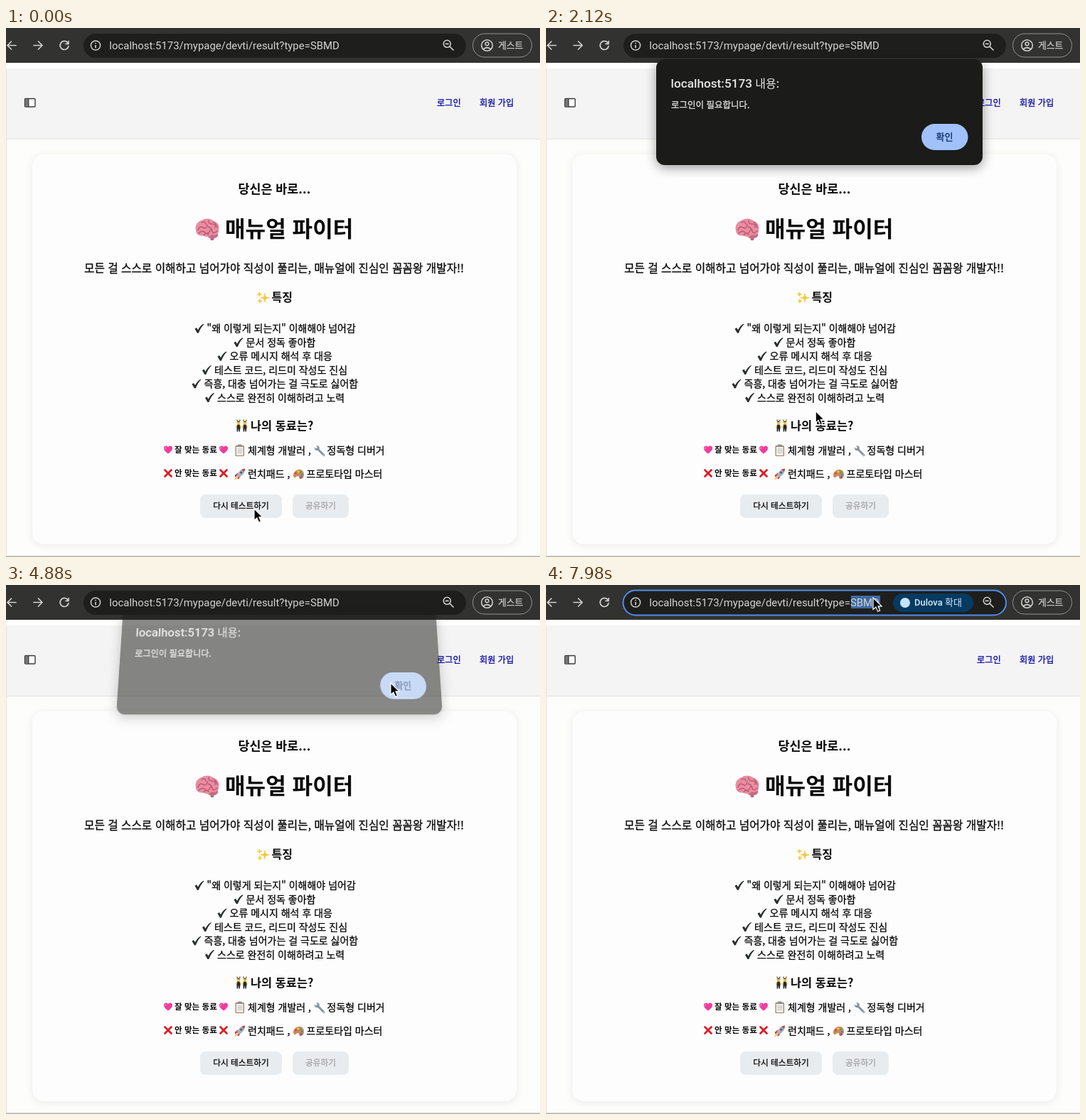
Recreate the animation shown at these times as an HTML page. Size 751 by 745 pixels, loop 8 s.

```html
<!DOCTYPE html>
<html lang="ko">
<head>
<meta charset="utf-8">
<title>DevTI result</title>
<style>
  html, body { margin: 0; width: 100%; height: 100%; overflow: hidden; background: #fdfdfc; }
  svg { position: absolute; left: 0; top: 0; overflow: visible; }
  text { font-family: "Noto Sans CJK KR", "Noto Sans CJK JP", "Noto Sans CJK", sans-serif; white-space: pre; }
  .latin { font-family: Roboto, "Noto Sans CJK KR", "Noto Sans CJK JP", sans-serif; }
  .line { fill: none; stroke: #d0d0ce; stroke-width: 1.7; stroke-linecap: round; stroke-linejoin: round; }
  #card { position: absolute; left: 37px; top: 178px; width: 681px; height: 549px; border-radius: 16px;
    background: #fdfdfd; box-shadow: 0 2px 12px rgba(40, 40, 60, .09); }
  #dialog { position: absolute; left: 155px; top: 44px; width: 459px; height: 149px; border-radius: 12px;
    background: #1b1b19; box-shadow: 0 4px 16px rgba(0, 0, 0, .38); transform-origin: 50% 100%; }
</style>
</head>
<body>
<svg id="chrome" width="751" height="745"></svg>
<div id="card"></div>
<svg id="page" width="751" height="745"></svg>
<div id="dialog"><svg id="alert" width="459" height="149"></svg></div>
<svg id="pointer" width="20" height="26">
  <path d="M0 0V16.5L3.9 13L6.6 19.2L9.6 17.9L7 11.8H12Z" fill="#000" stroke="#fff" stroke-width="1.2"/>
</svg>
<script>
const $ = id => document.getElementById(id);

const bold = 'font-weight="700"';
const latin = 'class="latin"';
const medium = fill => `stroke="${fill}" stroke-width=".3"`;

// Text placed by its left edge and vertical centre
const text = (x, cy, size, str, fill = '#0a0a0a', attrs = medium(fill)) =>
  `<text x="${x}" y="${cy + size * .36}" font-size="${size}" fill="${fill}" ${attrs}>${str}</text>`;
const rect = (x, y, w, h, r, fill, attrs = '') =>
  `<rect x="${x}" y="${y}" width="${w}" height="${h}" rx="${r}" fill="${fill}" ${attrs}/>`;
const circle = (x, y, r, fill, attrs = '') =>
  `<circle cx="${x}" cy="${y}" r="${r}" fill="${fill}" ${attrs}/>`;
const path = (d, fill, attrs = '') => `<path d="${d}" fill="${fill}" ${attrs}/>`;
const line = d => `<path class="line" d="${d}"/>`;
const at = (x, y, art) => `<g transform="translate(${x} ${y})">${art}</g>`;

const check = path('M.5 7.5L3 5.8L5 9C7 5 10 1.6 13 .3L13.4 1.2C10 4.5 7.6 8.6 5.9 13.2L4 13.5Z', '#2b2f2f');
const cross = path('M1.5 1.5L10.5 10.5M10.5 1.5L1.5 10.5', 'none', 'stroke="#dc1c28" stroke-width="2.8" stroke-linecap="round"');
const heart = path('M6 11.5C2 8.5 0 6.5 0 3.7C0 .2 4.4-.6 6 2.3C7.6-.6 12 .2 12 3.7C12 6.5 10 8.5 6 11.5Z', '#f23b9d') +
  path('M3 2.2Q1.6 3 2 5', 'none', 'stroke="#ff9bd2" stroke-width="1.3"');
const star = (x, y, r) =>
  path(`M${x} ${y - r}Q${x} ${y} ${x + r} ${y}Q${x} ${y} ${x} ${y + r}Q${x} ${y} ${x - r} ${y}Q${x} ${y} ${x} ${y - r}Z`,
    '#fbc63c', 'stroke="#fbc63c" stroke-width=".9"');
const sparkles = star(11, 9, 6) + star(3.5, 4, 3) + star(4, 13.5, 3);

const brain =
  path('M20 21L27 22L26 31L22 31Z', '#b9657c') +
  path('M17 25Q21 31 30 27Q35 23 29 19L18 20Z', '#c56c83') +
  path('M1 17C-1 10 4 4 9 3C14-1 23 0 26 4C32 5 35 12 33 17C34 22 28 25 23 23C21 27 14 27 12 24C6 26 1 22 1 17Z', '#e98da2') +
  path('M4 17Q6 10 11 13T17 9M9 6Q14 3 15 8M19 3Q18 8 24 8T28 13M5 21Q10 16 14 20T22 16M18 12Q23 13 24 18T31 18M12 24Q15 19 19 23M26 5Q30 8 31 13',
    'none', 'stroke="#bd5973" stroke-width="1.5" stroke-linecap="round"');

const dancer =
  path('M2 1L2.6 5M6 1L5.4 5', 'none', 'stroke="#222" stroke-width="1"') +
  circle(4, 5.2, 2.4, '#f5bd32') +
  path('M1.8 5Q4 1.6 6.2 5L5.5 4.4H2.5Z', '#3a2a18') +
  path('M2 8H6L6.6 12L5.8 18H4.5L4 13L3 18H1.7L1.5 12Z', '#24262a') +
  path('M2 8.5L.4 12M6 8.5L7.6 12', 'none', 'stroke="#f5bd32" stroke-width="1.2"');
const dancers = dancer + at(9, 0, dancer);

const clipboard = rect(1.5, 1.5, 12.5, 15, 1.5, '#a9784f') + rect(2.7, 3.2, 10.1, 12.3, .5, '#f1f2f2') +
  rect(4.7, 0, 6, 3.4, 1, '#8b9298') +
  path('M4.5 6.5H11.5M4.5 9H11.5M4.5 11.5H11.5', 'none', 'stroke="#a9adb2" stroke-width=".9"');
const wrench = path('M5 5L14 14', 'none', 'stroke="#8b949b" stroke-width="3" stroke-linecap="round"') +
  path('M1 3L3.5 5.3L5.3 3.6L3.2 1C6 0 8.5 2.4 7.7 5L5.4 7.5C3 8.4 .2 6 1 3Z', '#8b949b') + circle(13.7, 13.7, .7, '#e8eaec');
const rocket = path('M5 6L1 9L1 12L5 10ZM9 10L7 14L4.5 15L5 11Z', '#d83a37') +
  path('M3 11L0 16L5 13Z', '#f9b233') +
  path('M15 0C10 0 6 4 3.5 10L6 12.5C12 10 15 6 15 0Z', '#a8b2bb') +
  path('M15 0Q12 0 10.5 1.5L13.5 4.5Q15 3 15 0Z', '#d83a37') + circle(9.7, 5.6, 1.7, '#2f6790');
const palette = path('M8 1C12.5 0 16 3 16 8C16 12.6 12.5 15 10.5 14C8 13 10 10 8 10C5 10 5 13 2.5 12C-1 9 2 2 8 1Z', '#c98b56') +
  [[4.5, 6, '#e3423f'], [8, 3.8, '#f7c531'], [11.6, 4.6, '#49a94e'], [13.2, 8, '#3c87d6'], [12, 11.4, '#8d4bb5']]
    .map(([x, y, c]) => circle(x, y, 1.5, c)).join('');

const url = 'localhost:5173/mypage/devti/result?type=SBMD';
$('chrome').innerHTML =
  rect(0, 0, 751, 49, 0, '#323231') +
  rect(109, 8, 538, 34, 17, '#1e1e1d') +
  rect(108.5, 7.5, 538.5, 35, 17.5, 'none', 'stroke="#4f8eea" stroke-width="2" id="ring"') +
  rect(429, 15, 41, 18, 0, '#3f6ba3', 'id="selection"') +
  line('M14 24.5H2M7.5 19L2 24.5L7.5 30M39 24.5H51M45.5 19L51 24.5L45.5 30') +
  line('M87 21A6 6 0 1 0 88 25.5M88 18.5V22.3H84') +
  circle(126, 24.5, 6.6, 'none', 'stroke="#d0d0ce" stroke-width="1.5"') +
  line('M126 24.5V27.5M126 21.3V21.4') +
  text(145.3, 24.6, 14.95, url, '#d4d4d2', latin) +
  `<g id="chip">${rect(488, 12, 113, 26, 13, '#073a61') + circle(505, 25, 7, '#c5e2ff') +
    text(518, 24.8, 13, 'Dulova 확대', '#d2e9ff', latin + ' font-weight="500"')}</g>` +
  circle(620.3, 22.3, 5, 'none', 'stroke="#d0d0ce" stroke-width="1.6"') + line('M624 26L629 31M618.5 22.3H622') +
  rect(656.5, 8, 83, 33, 16.5, 'none', 'stroke="#92928f"') +
  circle(676.5, 24.5, 7.8, 'none', 'stroke="#d0d0ce" stroke-width="1.6"') +
  circle(676.5, 22.3, 2.4, 'none', 'stroke="#d0d0ce" stroke-width="1.5"') + line('M671.5 29.7Q676.5 25.7 681.5 29.7') +
  text(692, 24.7, 12.8, '게스트', '#c6c6c4') +
  rect(0, 49, 751, 8, 0, '#fff') +
  rect(0, 57, 751, 99, 0, '#f4f4f5') + rect(0, 156, 751, 1, 0, '#e3e3e5') +
  rect(0, 57, 1, 687, 0, '#e2e2e2') + rect(0, 743.5, 751, 1.5, 0, '#b5afa8') +
  rect(26.5, 99.5, 14.5, 11.5, 1, '#fafafa', 'stroke="#3c3c3c" stroke-width="1.4"') +
  rect(27, 100, 4.5, 10.5, 0, '#77777a') + rect(31, 99.5, 1.3, 11.5, 0, '#3c3c3c') +
  text(606, 105.3, 12.2, '로그인', '#0b0ba8') +
  text(666, 105.3, 12.2, '회원 가입', '#0b0ba8');

const traits = [
  [265, '"왜 이렇게 되는지" 이해해야 넘어감'], [320, '문서 정독 좋아함'], [297, '오류 메시지 해석 후 대응'],
  [275.5, '테스트 코드, 리드미 작성도 진심'], [261, '즉흥, 대충 넘어가는 걸 극도로 싫어함'], [279.5, '스스로 완전히 이해하려고 노력']];
const button = (x, w, label, fill) =>
  rect(x + .5, 657.5, w - 1, 32, 7, '#e9ecef', 'stroke="#e6edf1"') +
  text(x + w / 2, 673, 11.7, label, fill, 'text-anchor="middle" ' + medium(fill));

$('page').innerHTML =
  text(326.5, 226.5, 17.4, '당신은 바로...', '#0a0a0a', bold) +
  at(266, 268, brain) + text(308, 283, 31.1, '매뉴얼 파이터', '#0a0a0a', bold) +
  text(110, 338, 15.68, '모든 걸 스스로 이해하고 넘어가야 직성이 풀리는, 매뉴얼에 진심인 꼼꼼왕 개발자!!') +
  at(353, 371, sparkles) + text(373.5, 379, 16, '특징', '#0a0a0a', bold) +
  traits.map(([x, label], i) => {
    const y = 423.3 + i * 19.45;
    return at(x, y - 7, check) + text(x + 17.5, y, 14, label);
  }).join('') +
  at(323, 550.5, dancers) + text(344, 560, 16.4, '나의 동료는?', '#0a0a0a', bold) +
  at(222, 588, heart) + text(237, 593.7, 11.6, '잘 맞는 동료', '#0a0a0a', bold) + at(300, 588, heart) +
  at(321, 586.5, clipboard) + text(340, 595, 14, '체계형 개발러 ,') +
  at(433, 587.5, wrench) + text(451.5, 595, 14, '정독형 디버거') +
  at(222, 621, cross) + text(237, 627, 11.6, '안 맞는 동료', '#0a0a0a', bold) + at(300, 621, cross) +
  at(321, 620.5, rocket) + text(340, 628.3, 14, '런치패드 ,') +
  at(403, 621, palette) + text(422.5, 628.3, 14, '프로토타입 마스터') +
  button(273, 115, '다시 테스트하기', '#0a0a0a') + button(403, 79, '공유하기', '#a3a3a6');

$('alert').innerHTML =
  text(20.5, 33.8, 17.2, 'localhost:5173 <tspan font-size="16">내용:</tspan>', '#e6e6e4', latin + ' font-weight="500"') +
  text(21, 64.5, 12.5, '로그인이 필요합니다.', '#e2e2e0') +
  rect(373, 91, 65.5, 37, 18.5, '#a0c1fa') +
  text(405.5, 109.5, 13, '확인', '#0b2a66', 'text-anchor="middle" ' + medium('#0b2a66'));

// Pointer route: time, x, y
const route = [[0, 349, 677], [600, 340, 678], [1200, 327, 675], [1700, 327, 675], [2120, 379, 540], [2900, 515, 220],
  [3520, 546, 114], [4150, 548, 146], [4700, 541, 142], [4880, 541, 138], [5440, 536, 131], [5800, 530, 115],
  [6500, 468, 20], [7300, 462, 18], [8000, 460, 18]];

const clamp = v => Math.max(0, Math.min(1, v));

function pointerAt(t) {
  const i = route.findIndex(p => p[0] > t);
  const [t0, x0, y0] = route[i - 1], [t1, x1, y1] = route[i];
  const u = (t - t0) / (t1 - t0);
  return [x0 + (x1 - x0) * u, y0 + (y1 - y0) * u];
}

function draw(t) {
  const stall = (t - 1560) % 840;
  if (t >= 1560 && stall < 100) t -= stall;

  const [x, y] = pointerAt(t);
  $('pointer').style.transform = `translate(${x}px, ${y}px)`;

  const alpha = Math.min(clamp((t - 1310) / 200), clamp((4985 - t) / 200));
  const away = 1 - alpha, tilt = .094 * away / 149;
  $('dialog').style.opacity = alpha;
  $('dialog').style.transform = away === 0 ? 'none'
    : `matrix3d(1,0,0,0, 0,${1 + 149 * tilt},0,${-tilt}, 0,0,1,0, 0,${-22 * away},0,1)`;

  const focused = t >= 6760, all = t < 7200;
  for (const id of ['ring', 'chip', 'selection']) $(id).style.display = focused ? '' : 'none';
  $('selection').setAttribute('x', all ? 145 : 429);
  $('selection').setAttribute('width', all ? 325 : 41);
}

function tick() {
  draw(performance.now() % 8000);
  requestAnimationFrame(tick);
}
tick();
</script>
</body>
</html>
```
